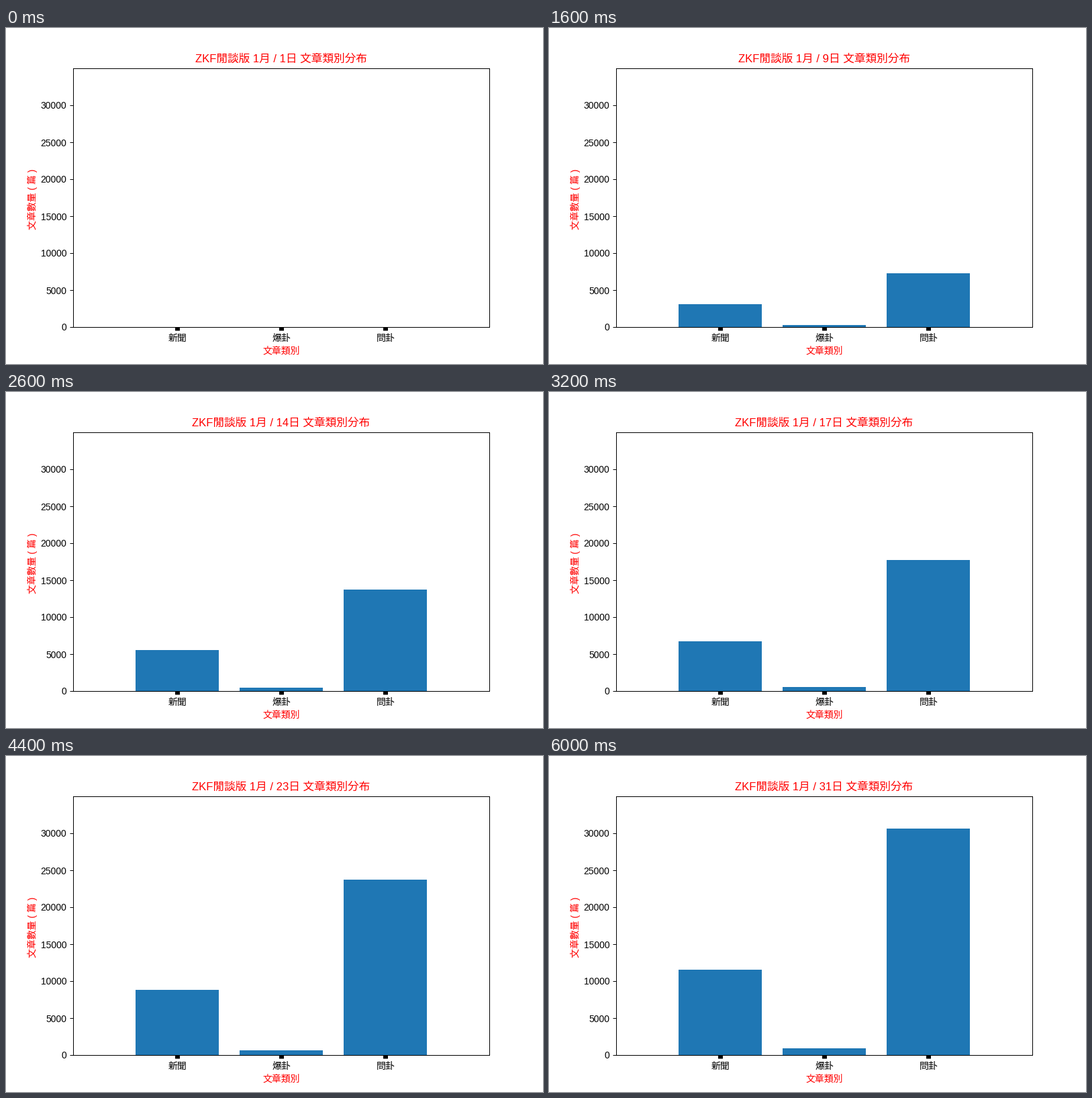
A matplotlib script that plays this animation: 800 px wide and 500 px high, repeating every 6200 ms.

```python
import numpy as np
import matplotlib.pyplot as plt
from matplotlib.animation import FuncAnimation

W, H, DPI = 800, 500, 100
DAYS = 31
HAIRLINE = 72 / DPI

plt.rcParams.update({
    "font.family": ["Liberation Sans", "Noto Sans CJK JP"],
    "axes.linewidth": HAIRLINE,
    "ytick.major.width": HAIRLINE,
})


def total(day, rate, surge, peak, pace):
    """Articles so far: a steady daily rate plus a mid-month surge."""
    def wave(d):
        return surge / (1 + np.exp(-pace * (d - peak)))
    return rate * (day - 1) + wave(day) - wave(1)


# Daily rate, size of the surge, its peak day and its pace
GROWTH = {
    "新聞": (342, 1290, 10.9, 0.5),
    "爆卦": (26, 100, 11, 0.5),
    "問卦": (850, 5150, 13.85, 0.46),
}

fig = plt.figure(figsize=(W / DPI, H / DPI), dpi=DPI, facecolor="white")
ax = fig.add_axes([100 / W, 55 / H, 620 / W, 385 / H])
ax.set_xlim(-1, 3)
ax.set_ylim(0, 35000)
ax.set_xticks(range(len(GROWTH)), [""] * len(GROWTH))
ax.set_yticks(range(0, 30001, 5000))
ax.tick_params(axis="x", width=5)
bars = ax.bar(range(len(GROWTH)), [0] * len(GROWTH), color="#1f77b4")


def label(x, y, text, size=10, color="red", rotation=0):
    """Text centred on x with its baseline at y, in pixels from the top left."""
    return fig.text(x / W, 1 - y / H, text, size=size, color=color,
                    ha="center", va="baseline", rotation=rotation,
                    rotation_mode="anchor")


title = label(410, 51, "", size=12)
label(410.5, 484.5, "文章類別")
label(43.6, 254.5, "文章數量 ( 篇 )", rotation=90)
for i, name in enumerate(GROWTH):
    label(255.6 + 155 * i, 466.3, name, color="black")


def update(frame):
    day = frame + 1
    for bar, growth in zip(bars, GROWTH.values()):
        bar.set_height(total(day, *growth))
    title.set_text(f"ZKF閒談版 1月 / {day}日 文章類別分布")
    return [*bars, title]


anim = FuncAnimation(fig, update, frames=DAYS, interval=200,
                     repeat=True, repeat_delay=0)
plt.show()
```
